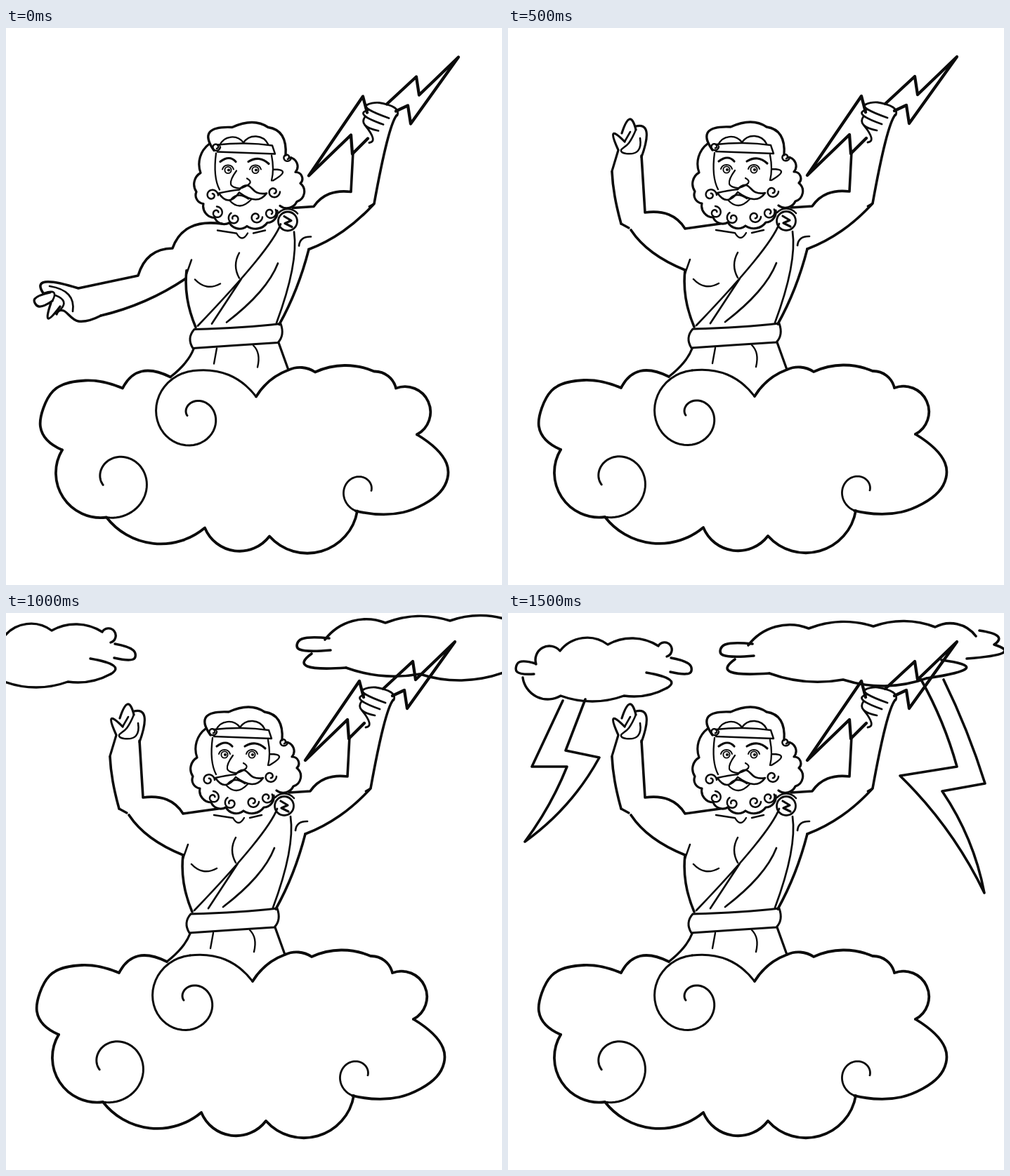
Recreate the animation shown at these times as an HTML page. Size 706 by 794 pixels, loop 2000 ms.

```html
<!DOCTYPE html>
<html lang="en">
<head>
<meta charset="utf-8">
<style>
  html, body { margin: 0; width: 100%; height: 100%; overflow: hidden; background: #fff; }
  svg { display: block; width: 706px; height: 794px; }
  path, circle { fill: none; stroke: #0b0b0b; stroke-linecap: round; stroke-linejoin: round; }
</style>
</head>
<body>
<svg id="stage" viewBox="0 0 706 794"></svg>
<script>
const stage = document.getElementById('stage');

function add(parent, tag, attrs = {}) {
  const node = document.createElementNS('http://www.w3.org/2000/svg', tag);
  for (const key in attrs) node.setAttribute(key, attrs[key]);
  return parent.appendChild(node);
}
const group = () => add(stage, 'g');
const ink = (parent, width, d) => add(parent, 'path', { d, 'stroke-width': width });
const numbers = text => text.trim().split(/\s+/).map(Number);

// Extends a curve beyond its end so that the end keeps its bend.
const beyond = (a, b, c) => c ? a.map((v, k) => 3 * v - 3 * b[k] + c[k]) : a;

// Smooth curve through points. '|' is a sharp corner, ';' lifts the pen.
function curve(parent, width, text) {
  let d = '';
  for (const stroke of text.split(';')) {
    let last = null;
    for (const piece of stroke.split('|')) {
      const n = numbers(piece), p = last ? [last] : [];
      for (let i = 0; i < n.length; i += 2) p.push([n[i], n[i + 1]]);
      if (!last) d += 'M' + p[0];
      const end = p.length - 1;
      for (let i = 0; i < end; i++) {
        const b = p[i], c = p[i + 1];
        const a = p[i - 1] || beyond(b, c, p[i + 2]);
        const e = p[i + 2] || beyond(c, b, p[i - 1]);
        d += `C${b.map((v, k) => v + (c[k] - a[k]) / 6)} ${c.map((v, k) => v - (e[k] - b[k]) / 6)} ${c}`;
      }
      last = p[end];
    }
  }
  return ink(parent, width, d);
}

// Chain of circular arcs: x y bulge x y bulge ... x y
function arcs(parent, width, text) {
  const n = numbers(text);
  let d = `M${n[0]} ${n[1]}`;
  for (let i = 0; i + 4 < n.length; i += 3) {
    const [x, y, bulge, u, v] = n.slice(i, i + 5);
    const h = Math.hypot(u - x, v - y) / 2, b = Math.abs(bulge);
    const r = b ? (h * h + b * b) / (2 * b) : 0;
    d += `A${r} ${r} 0 ${+(b > h)} ${+(bulge > 0)} ${u} ${v}`;
  }
  return ink(parent, width, d);
}

// Radius runs from r0 to r1 while the angle runs from a0 to a1 degrees.
function spiral(parent, width, x, y, r0, r1, a0, a1) {
  const pts = [], count = 60;
  for (let i = 0; i <= count; i++) {
    const t = i / count, r = r0 + (r1 - r0) * t;
    const a = (a0 + (a1 - a0) * t) * Math.PI / 180;
    pts.push([x + r * Math.cos(a), y + r * Math.sin(a)]);
  }
  return ink(parent, width, 'M' + pts.join('L'));
}

const figure = group(), armLow = group(), armHigh = group();
const cloudLeft = group(), cloudRight = group(), strikes = group();

// Big cloud
curve(figure, 3.8, '75 601 44 568 62 517 108 502 161 513 | 188 489 229 497');
curve(figure, 3, '351 525 312 494 262 488');
spiral(figure, 3, 262, 552, 64, 9, -90, -540);
arcs(figure, 3.8, '351 525 5 397 487 5 435 490 9 519 489 7 550 513 34 580 579');
curve(figure, 3.8, '580 579 622 620 613 661 560 690 493 688');
arcs(figure, 3.8, '495 688 41 370 724 27 278 712 30 138 697 36 75 601');
spiral(figure, 3, 152, 644, 55, 20, 105, -200);
spiral(figure, 2.8, 501, 659, 30, 14, 105, 360);

// Torso
curve(figure, 3.6, '252 345 253 385 265 426; 426 315 408 371 384 422');
curve(figure, 2.5, '259 330 252 350; 264 358 281 368 300 364; 327 320 322 338 327 356');
curve(figure, 2.4, '296 288 322 292; 323 292 331 299 339 292; 347 292 364 288');
curve(figure, 2.7, '386 279 350 333 268 424; 382 335 356 376 309 419; 330 357 288 421; 405 290 402 345 380 420');
curve(figure, 3, '263 429 330 426 386 421 | 388 436 382 448 | 320 452 261 456 | 257 442 263 429');
curve(figure, 3.3, '262 457 250 477 229 497; 383 448 397 487');
curve(figure, 2.4, '295 456 291 478; 347 452 354 465 353 483');

// Raised right arm and fist
curve(figure, 3.6, '403 256 433 254 | 455 236 486 233 | 489 176');
curve(figure, 3.6, '551 124 537 163 519 250 | 475 289 426 315');
curve(figure, 2.7, '519 250 512 254; 412 310 417 300 429 297');
curve(figure, 2.8, '552 124 548 113 526 106 509 109 512 116 540 128; 512 116 505 124 532 137; 506 126 506 138 525 146; 506 138 517 156 512 163');

// Hand-held bolt
ink(figure, 4.3, 'M537 108L579 69 583 95 639 41 571 136 567 110 550 118');
ink(figure, 4.3, 'M509 120L503 97 426 210 486 152 488 179 510 157');

// Hair and beard
curve(figure, 3.4, '291 174 285 148 317 141 | 345 134 368 141 | 388 153 393 181');
arcs(figure, 3.2, '284 165 -7 272 206 -6 266 233 -5 276 250 -6 292 270 -5 313 277 -6 338 282 -6 367 277 -5 381 260');
arcs(figure, 3.2, '398 184 7 407 205 6 414 221 8 409 247 6 385 253');
arcs(figure, 2.4, '299 167 10 333 163 10 368 165');
curve(figure, 2.4, '296 166 335 164 374 167 | 378 179 | 296 176');

// Face
curve(figure, 2.3, '294 178 293 208 299 230; 373 181 375 200 373 217; 375 201 389 205 375 217');
curve(figure, 3.2, '300 190 312 185 322 190; 340 190 355 186 369 193');
for (const x of [311, 350]) {
  arcs(figure, 2, `${x - 8} 201 6 ${x + 8} 201`);
  add(figure, 'circle', { cx: x, cy: 202, r: 4.6, 'stroke-width': 1.9 });
  add(figure, 'circle', { cx: x + 1, cy: 202, r: 1.2, 'stroke-width': 1.8 });
}
curve(figure, 2.2, '323 203 315 222 328 228 342 221 338 214');
curve(figure, 2.7, '327 230 313 232 298 235 | 312 245 327 234 | 350 244 366 235 | 352 234 339 224 327 230');
curve(figure, 2.3, '313 245 328 253 344 244; 316 243 327 238 340 243');

// Curls: centre, start angle, direction
const curls = [
  [288, 238, 0, -1], [295, 263, -90, 1], [320, 271, -120, -1], [351, 269, 0, 1],
  [371, 263, -30, 1], [376, 233, 0, 1], [294, 169, 0, 1], [395, 184, 0, 1],
];
curls.forEach(([x, y, a, way], i) =>
  spiral(figure, 2.5, x, y, i < 6 ? 9 : 6, 2.5, a, a + way * 430));

// Brooch
add(figure, 'circle', { cx: 396, cy: 275, r: 13.5, 'stroke-width': 2.8 });
ink(figure, 3.2, 'M391 268L401 274 392 278 402 283');
arcs(figure, 2.6, '383 263 6 410 264');

// Left arm stretched out
curve(armLow, 3.6, '307 279 262 284 237 314 | 206 324 188 353 | 103 371 | 56 362 53 378');
curve(armLow, 3.3, '63 377 41 386 47 397 66 389; 64 392 60 414 77 397; 72 408 82 403 103 418 135 410');
curve(armLow, 2.7, '54 378 68 377 66 389; 62 368 89 380 95 404; 70 381 82 390 77 402');
curve(armLow, 3.6, '135 410 198 389 256 357');

// Left arm raised
curve(armHigh, 3.6, '302 279 252 286 | 229 266 195 263 | 190 182');
curve(armHigh, 3.6, '148 205 152 240 161 279; 175 288 206 320 252 345');
curve(armHigh, 3.2, '161 279 172 285; 148 204 157 174 | 150 151 166 162; 162 150 173 130 182 145; 182 140 197 148 190 184');
curve(armHigh, 2.6, '166 162 174 148; 182 145 172 164 161 174 168 179; 168 179 185 175 188 157');

// Drifting clouds
curve(cloudLeft, 3.4, '37 87 13 84 16 70 39 72; 232 64 258 73 258 86 231 84; 197 85 230 95 226 107');
arcs(cloudLeft, 3.4, '40 73 16 74 54 14 142 45 10 214 47 14 226 62');
arcs(cloudLeft, 3.4, '226 107 5 165 118 8 75 118 16 21 92');
curve(cloudRight, 3.6, '350 61 306 60 309 45 348 44; 671 25 697 33 692 45 | 704 57 653 65');
arcs(cloudRight, 3.6, '342 46 15 428 22 8 520 19 8 608 20 11 666 33');
curve(cloudRight, 3.6, '617 67 652 79 596 93; 372 86 317 84 323 66');
arcs(cloudRight, 3.6, '596 93 10 477 95 7 372 86');

// Falling bolts
arcs(strikes, 3.6, '78 125 0 34 219 0 84 219 4 24 326 -9 130 206 0 82 196 0 110 123');
arcs(strikes, 3.6, '588 95 4 639 219 0 558 232 9 678 399 -8 618 254 0 679 243 -3 620 95');

const stepTime = 500;
// Shifts of the figure and the clouds; a missing one hides the part.
const steps = [
  { body: [5, .5] },
  { body: [0, 0], raised: true },
  { body: [0, 0], raised: true, left: [-77, -20], right: [112, -8] },
  { body: [0, 0], raised: true, left: [0, 0], right: [0, 0], strike: true },
];

function show(node, on) { node.style.display = on ? '' : 'none'; }
function place(node, at) {
  show(node, at);
  if (at) node.setAttribute('transform', `translate(${at})`);
}

function draw() {
  const s = steps[Math.floor(performance.now() / stepTime) % steps.length];
  place(figure, s.body);
  place(cloudLeft, s.left);
  place(cloudRight, s.right);
  show(armLow, !s.raised);
  show(armHigh, s.raised);
  show(strikes, s.strike);
  requestAnimationFrame(draw);
}
draw();
</script>
</body>
</html>
```
